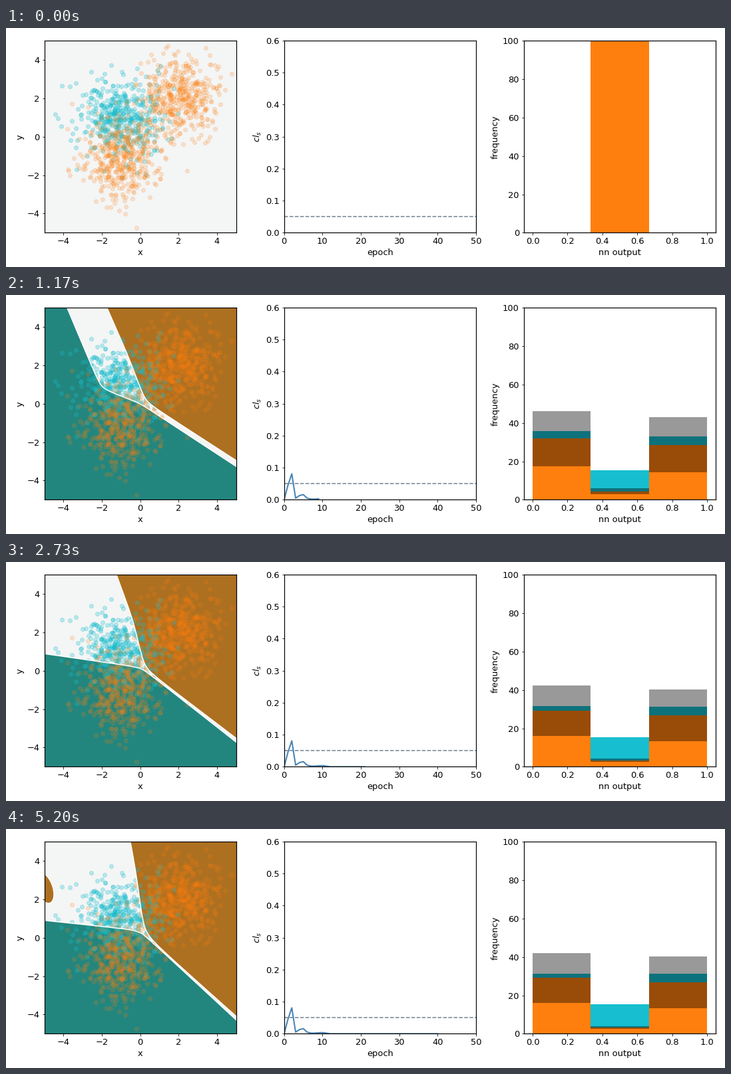
Animation, 1080 px wide and 360 px high, one loop 5330 ms. Source, as a matplotlib script:

```python
import numpy as np
import matplotlib.pyplot as plt
from matplotlib.animation import FuncAnimation
from matplotlib.patches import Polygon

EPOCHS = 41
plt.rcParams.update({"font.family": "DejaVu Sans", "font.size": 13,
                     "axes.linewidth": 1.2})
cmap = plt.get_cmap("BrBG")
rng = np.random.default_rng(4)


def blob(x, y, n=450):
    return rng.normal((x, y), 1.05, (n, 2)).T


# Four knots per boundary at a few epochs: left end, two bends, right end.
KEYS = [5, 9, 17, 40]
UPPER = np.array([
    [(-5, 2.9), (-1, 1.9), (.4, -.05), (5, -2.16)],
    [(-1.74, 5), (-.6, 2.4), (.25, .1), (5, -2.96)],
    [(-1.4, 5), (-.4, 2.5), (.2, .1), (5, -3.4)],
    [(-.52, 5), (-.15, 3), (.13, .22), (5, -4.1)],
])
LOWER = np.array([
    [(-5, 1.26), (-1, .05), (.1, -.2), (5, -2.6)],
    [(-3.82, 5), (-2.05, .78), (0, 0), (5, -3.27)],
    [(-5, .88), (-.6, .22), (.1, .1), (5, -3.6)],
    [(-5, .9), (-.5, .43), (.05, .3), (5, -4.28)],
])

# Bin heights settle exponentially: rows are background, error, signal.
SETTLED = np.array([[29, 3.3, 26.7], [13, .8, 13.4], [2.2, 12, 4.5]])
EXCESS = np.array([[7.5, 3, 5.2], [3.8, 2.3, 2.5], [4.7, -2.7, -.7]])
UNTRAINED = np.array([[0, 130, 0], [0, 0, 0], [0, 20, 0]])

cls = np.zeros(EPOCHS)
cls[:12] = [0, .045, .081, .005, .013, .016, .005, .002, .002, .003, .0035,
            .002]

grid = np.linspace(-8, 8, 1601)


def knots_at(states, n):
    k = np.interp(n, KEYS, range(len(KEYS)))
    i = min(int(k), len(KEYS) - 2)
    return states[i] + (k - i) * (states[i + 1] - states[i])


def boundary(knots, r=0.2):
    """Polyline through the knots with each bend rounded to a hyperbola."""
    x, y = knots.T
    m = np.diff(y) / np.diff(x)
    out = y[0] + m[0] * (grid - x[0])
    for xk, dm in zip(x[1:], np.diff(m)):
        d = grid - xk
        out += dm * (d + np.hypot(d, r)) / 2
    return out


def half_plane(y, far):
    return np.vstack([np.c_[grid, y], [(8, far), (-8, far)]])


def island(size):
    t = np.linspace(0, 2 * np.pi, 80)
    return np.c_[-5 + size * 0.5 * np.cos(t),
                 2.6 + size * (0.73 * np.sin(t) - 0.35 * np.cos(t))]


fig, (ax, ax_cls, ax_hist) = plt.subplots(1, 3, figsize=(15, 5), dpi=72)
fig.subplots_adjust(left=57.6 / 1080, right=1066 / 1080, bottom=51.6 / 360,
                    top=341 / 360, wspace=0.25)

ax.set(xlim=(-5, 5), ylim=(-5, 5), xlabel="x", ylabel="y",
       facecolor=cmap(0.5))


def region(level):
    fill = Polygon([(9, 9)] * 3, fc=cmap(level), ec="none", zorder=0.5)
    edge = Polygon([(9, 9)] * 3, fc="none", ec="w", lw=1.5, zorder=2)
    for patch in (fill, edge):
        ax.add_patch(patch)
    return fill, edge


brown, teal, islet = region(1 / 6), region(5 / 6), region(1 / 6)
ax.scatter(*blob(-1, 1), c="C9", alpha=0.27)
ax.scatter(*blob(2, 2), c="C1", alpha=0.18)
ax.scatter(*blob(-1, -1), c="C1", alpha=0.18)

ax_cls.set(xlim=(0, 50), ylim=(0, 0.6), xlabel="epoch", ylabel="$cl_s$")
ax_cls.axhline(0.05, color="slategray", ls="--", lw=1.5)
cls_line, = ax_cls.plot([], [], color="steelblue", lw=2)

ax_hist.set(xlim=(-0.05, 1.05), ylim=(0, 100), xlabel="nn output",
            ylabel="frequency")
mids = (np.arange(3) + 0.5) / 3
bkg_bars = ax_hist.bar(mids, 0, 1 / 3, color="C1")
sig_bars = ax_hist.bar(mids, 0, 1 / 3, color="C9")
err_bars = ax_hist.bar(mids, 0, 1 / 3, color="k", alpha=0.4, lw=0)


def show(shape, visible, xy):
    for patch in shape:
        patch.set_visible(visible)
        patch.set_xy(xy)


def set_bars(bars, bottoms, heights):
    for bar, y, h in zip(bars, bottoms, heights):
        bar.set_y(y)
        bar.set_height(h)


def update(n):
    gap = 0.2 * max(5 - n, 0)  # the undecided band is wider early on
    show(brown, n > 0, half_plane(boundary(knots_at(UPPER, n)) + gap, 99))
    show(teal, n > 0, half_plane(boundary(knots_at(LOWER, n)) - gap, -99))
    show(islet, n > 36, island((n - 30) / 10))

    cls_line.set_data(np.arange(n + 1), cls[:n + 1])

    decay = np.exp(-(n - 5) / 4)
    bkg, err, sig = SETTLED + EXCESS * decay if n else UNTRAINED
    set_bars(bkg_bars, np.zeros(3), bkg)
    set_bars(sig_bars, bkg, sig)
    set_bars(err_bars, bkg - err, 2 * err)
    return []


anim = FuncAnimation(fig, update, frames=EPOCHS, interval=130, repeat=True,
                     repeat_delay=0)
plt.show()
```
